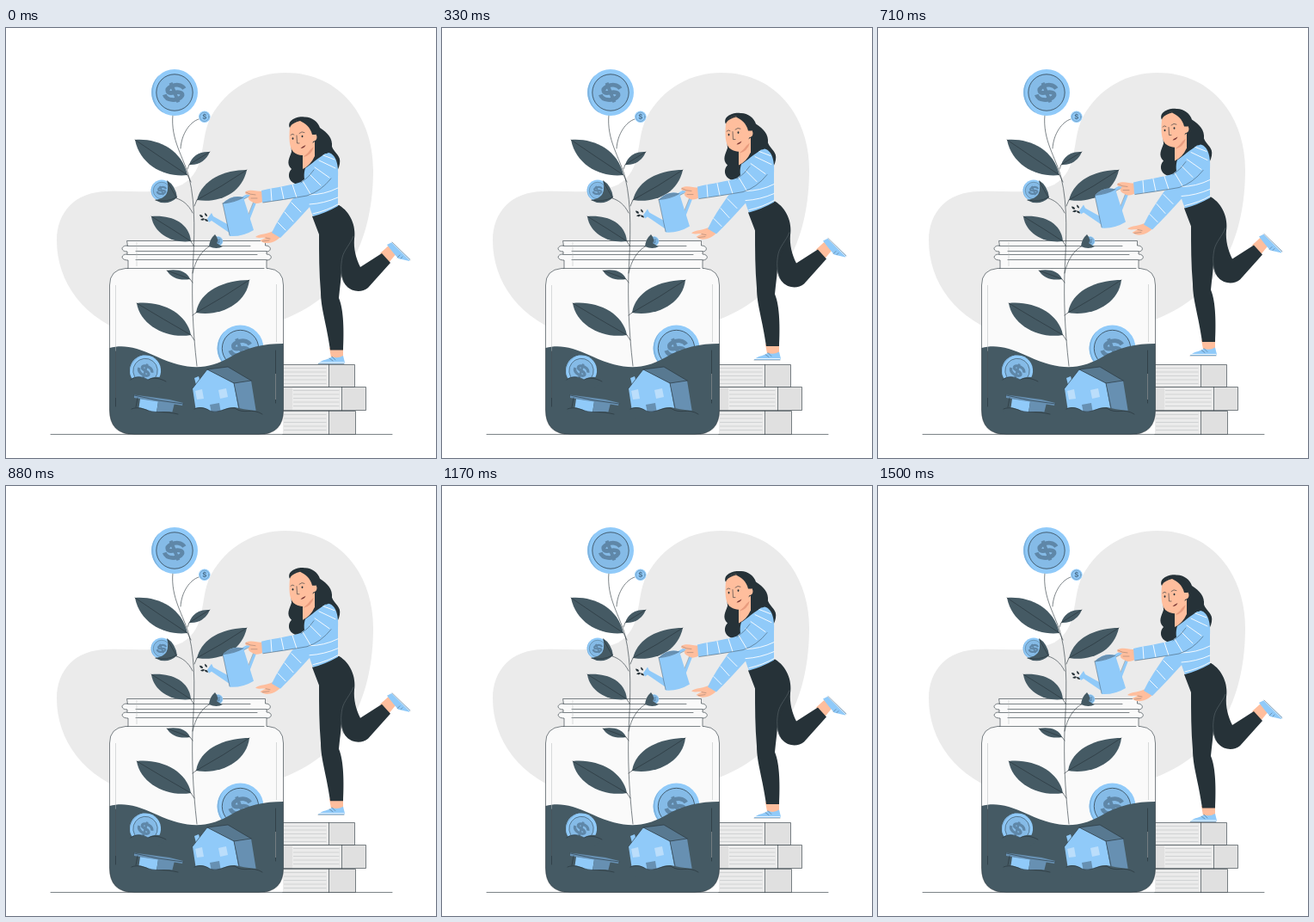
An HTML page for the animation above (1.54 s loop, 500 by 500 pixels).

```html
<!DOCTYPE html>
<html lang="en">
<head>
<meta charset="utf-8">
<title>Growing savings</title>
<style>
  html, body { margin: 0; width: 100%; height: 100%; overflow: hidden; background: #fff; }
  svg { display: block; width: 100vw; height: 100vh; }
  .line { fill: none; stroke: #263238; stroke-width: .6; stroke-linecap: round; stroke-linejoin: round; }
  .faint { fill: none; stroke: #b5b9bb; stroke-width: .5; }
  .white { fill: none; stroke: #fff; stroke-width: .9; stroke-linecap: round; }
  .soil { fill: #455a64; }
  .blue { fill: #90caf9; }
  .shade { fill: #6790b2; }
  .dark { fill: #263238; }
  .skin { fill: #ffbe9d; }
  .glass { fill: #fafafa; }
</style>
</head>
<body>
<svg viewBox="0 0 500 500">
  <defs>
    <g id="coin">
      <circle class="blue" r="27"/>
      <path d="M-18 -20A27 27 0 0 0 -12 24A30 30 0 0 1 -18 -20" fill="#7fb4df"/>
      <circle r="21.2" fill="#85bbe7" stroke="#263238" stroke-width=".7"/>
      <g fill="none" stroke="#5f87a8" stroke-width="4.8" transform="rotate(-12)">
        <path d="M12 -2C10 -8 3 -9 -2 -8C-10 -6 -9 0 -1 0C8 0 11 4 6 7C0 10 -11 8 -12 0"/>
        <path d="M-2 -12L2 12" stroke-width="4"/>
      </g>
    </g>
  </defs>

  <path fill="#ebebeb" d="M325 52C390 52 427 105 427 165C427 240 400 310 322 339C260 365 190 365 150 358C90 340 59 295 59 247C59 215 80 190 118 190C150 189 180 194 205 182C235 165 224 128 239 102C258 69 290 52 325 52Z"/>
  <path class="line" d="M52 472.5H449"/>

  <g id="books"></g>

  <!-- jar -->
  <path class="glass" d="M141 247.500H301.500V253C309 253 309 260 303 260V263C310 263 310 270 303 270V279.500H305Q322.500 281 322.500 299V444Q322.500 472.500 294 472.500H149Q120.500 472.500 120.500 444V299Q120.500 281 139 279.500H142V270C133 270 133 263 141 263V260C133 260 133 253 141 253Z"/>

  <use href="#coin" transform="translate(272.500 372.500)"/>
  <path class="soil" d="M120.500 372C135 368 150 370 175 382C212 399 235 397 260 383C280 371 300 367 322.500 367V444Q322.500 472.500 294 472.500H149Q120.500 472.500 120.500 444Z"/>

  <!-- buried things -->
  <use href="#coin" transform="translate(162 398.500) scale(.67) rotate(38)"/>
  <path class="soil" d="M142 410C150 404 158 405 165 409C172 405 180 404 188 411L175 420H150Z"/>
  <path class="line" d="M145 409C151 404 159 405 165 409C171 406 179 407 186 411"/>

  <path class="blue" d="M156 431L177 434L175 447L154 445Z"/>
  <path class="shade" d="M177 434L196 436L193 448H175Z"/>
  <path class="shade" d="M149 426.500L190 432L206 436L205 439L160 432L149 430Z"/>
  <path class="line" d="M149 427L177 433L206 437M153 430L151 441"/>
  <path class="soil" d="M144 444C152 439 160 442 166 445C176 449 184 443 201 448L190 456H152Z"/>
  <path class="line" d="M146 443C153 440 160 443 166 445C176 448 184 445 200 449"/>

  <path class="blue" d="M219 407L224 405L227 415L222 419Z"/>
  <path class="blue" d="M217 419L234 397L265 413L271 446H221Z"/>
  <path fill="#587991" d="M234 397L258 394L285 410L265 413Z"/>
  <path class="shade" d="M265 413L285 410L291 447H271Z"/>
  <path fill="#bbdefb" d="M220 422L228 420L230 431L222 432ZM247 421L256 419L258 429L249 431Z"/>
  <path class="shade" d="M237 438L248 436L250 448H239Z"/>
  <path class="line" d="M217 419L234 397L265 413L285 410M234 397L258 394L285 410M265 413L271 442"/>
  <path class="soil" d="M216 444C224 439 231 441 237 445C247 450 254 440 266 441C276 443 284 445 299 445L287 455H226Z"/>
  <path class="line" d="M219 443C226 440 232 442 237 445C247 449 254 441 266 442C277 450 286 441 298 449"/>

  <!-- glass outlines -->
  <path class="line" d="M141 247.500H301.500V253C309 253 309 260 303 260V263C310 263 310 270 303 270V279.500H305Q322.500 281 322.500 299V444Q322.500 472.500 294 472.500H149Q120.500 472.500 120.500 444V299Q120.500 281 139 279.500H142V270C133 270 133 263 141 263V260C133 260 133 253 141 253Z"/>
  <path class="line" d="M141 253.500H284M151 259.500H303M141 263.500H292M151 269.500H303M142 279.500H300"/>
  <path class="faint" d="M127.500 299V430M314.500 298V365"/>
  <path class="line" d="M127.500 376V440M313.500 375V436"/>
  <path class="faint" d="M313.500 402V432M152 249V277"/>

  <!-- plant -->
  <path class="line" d="M222 393C217 350 216 315 217 284C219 245 221 207 213 174C207 151 191 130 194 101M203 140C204 123 214 109 224 106M217 215C212 205 205 200 198 198M217 285C220 270 228 258 238 253M211 171L215 179M213 159L211 164M222 200L219 207M215 248L218 253M214 292L217 296M221 331L217 334M215 357L219 363"/>
  <g id="leaves"></g>
  <use href="#coin" transform="translate(196 75)"/>
  <circle class="blue" cx="230.800" cy="103.300" r="6.700"/>
  <circle class="line" cx="230.800" cy="103.300" r="5.200" stroke-opacity=".4"/>
  <text x="230.800" y="106.200" font-family="Inter, sans-serif" font-size="8" font-weight="700" text-anchor="middle" fill="#4f7390">$</text>
  <use href="#coin" transform="translate(181 189) scale(.46)"/>
  <path class="soil" d="M187 177Q197 183 199 197Q187 208 173 200Q187 198 188 188Q189 182 187 177Z"/>
  <path class="line" d="M198 197Q193 188 188 179M198 197Q187 203 174 200"/>
  <use href="#coin" transform="translate(246.500 248) scale(.21)"/>
  <path class="soil" d="M243 240Q248 246 245 250Q249 253 252 254Q245 258 236 254Q237 245 243 240Z"/>

  <g id="gardener">
    <!-- water drops -->
    <path class="dark" d="M225 217q4 0 4 3q-3 1 -4 -3M231 215q3 1 3 4q-3 0 -3 -4M226 223q3 -3 5 -1q-1 3 -5 1M231 222q4 0 4 3q-4 0 -4 -3"/>

    <!-- far arm -->
    <path class="skin" d="M313 235C305 240 294 239 290 243C295 245 299 243 302 244C297 246 294 248 297 248C299 251 311 252 319 243Z"/>
    <path class="line" d="M302 244L307 245M298 248L306 247" stroke-opacity=".45"/>
    <path class="blue" d="M350 190L333 199C324 212 315 225 309 238L319 244C332 231 343 219 354 207Z"/>
    <path class="white" d="M316 226L325 235M324 214L334 225M332 203L343 214"/>

    <!-- watering can -->
    <path d="M274 199C286 190 294 192 289 204L282 222" fill="none" stroke="#90caf9" stroke-width="3.200"/>
    <path class="line" d="M275 200C286 193 291 194 287 204L281 219" stroke-opacity=".5"/>
    <path class="blue" d="M234 222L239 215L241 219L259 229L261 239L239 224L236 226Z"/>
    <path class="blue" d="M252 204Q263 193 276 197L288 235Q275 243 260 242Z"/>
    <path class="shade" d="M252 204Q263 193 276 197Q266 202 252 204Z"/>
    <path class="line" d="M252 204Q266 203 276 197M252 204L260 241" stroke-opacity=".6"/>

    <!-- raised leg, then standing leg -->
    <path class="skin" d="M435 262L446 252L455 261L445 273Z"/>
    <path class="blue" d="M443 252L449 249L470 269L469 271L456 268L450 261Z"/>
    <path class="white" d="M449 249.500L469.500 270" stroke-width="1.400"/>
    <path class="line" d="M449 249L470 269.500M455 267L458 264M459 268L461 266" stroke-opacity=".6"/>
    <path class="skin" d="M376 372H392V383L384 386L378 383Z"/>
    <path class="blue" d="M363 390C368 385 375 386 379 382Q385 385 392 381L394 389L393 390.500H363Z"/>
    <path class="white" d="M364 389H393"/>
    <path class="line" d="M363 390.500H393M376 384L380 387M379 382L383 386" stroke-opacity=".6"/>
    <path class="dark" d="M387 206C401 214 407 231 405 245C404 257 407 268 412 278L437 262L447 273L421 302C414 308 402 307 396 300C392 296 391 291 389 284L388 220Z"/>
    <path class="dark" d="M356 219L387 206C398 215 404 229 404 242L390 280C390 291 388 302 387 314C393 328 393 354 392 374.500H377C373 345 366 326 366 307C364 285 364 262 364 240Z"/>
    <path d="M404 242C400 252 393 258 391 267C389 277 389 286 393 296" fill="none" stroke="#5c676c" stroke-width=".6"/>

    <!-- hair, head and neck -->
    <path class="dark" d="M330 116C326 108 338 102 347 103.500C355 103 363 109 365 116C374 122 380 128 379 138C382 146 390 148 388 158C386 169 379 174 370 173C356 169 351 182 336 181C328 178 327 169 332 164C325 157 330 151 332 144Z"/>
    <path class="skin" d="M345 142V164Q354 160 359 149L359 132Z"/>
    <path fill="#e99c7e" d="M346 150Q355 148 358 138L352 143Z"/>
    <path class="skin" d="M330 116C329 127 329 138 334 144C340 149 348 150 352 144Q356 139 357 132C364 131 362 121 357 123C355 115 349 109 342 107C336 107 332 110 330 116Z"/>
    <path class="dark" d="M330 115C331 106 349 103 356 112C360 117 360 120 360 124L356 124C354 115 348 111 342 108C337 109 333 111 330 115Z"/>
    <ellipse class="dark" cx="333.500" cy="128.500" rx=".9" ry="1.300"/>
    <ellipse class="dark" cx="344.500" cy="126" rx=".9" ry="1.300"/>
    <path class="line" d="M331 124.500Q333 122 335 124M341 122.500Q344 119.500 347 121.500M338 125L338.500 134L341 134"/>
    <path d="M342.500 140Q347 140 348.500 136Q344 138 342.500 140Z" fill="#7b3937"/>

    <!-- sweater -->
    <path class="blue" d="M375 145C385 147 387 162 386 175V207Q372 215 357 219C352 207 349 195 350 185C346 177 346 169 348 163C355 159 361 151 375 145Z"/>
    <path class="white" d="M353 205Q370 204 386 197M352 194Q370 194 386 186M357 216Q374 212 386 205"/>
    <path class="skin" d="M299 190C291 190 285 187 279 190C276 193 281 194 284 194C281 197 281 200 286 202C291 206 296 203 299 202Z"/>
    <path class="line" d="M279 191Q284 194 290 194M285 198L292 198" stroke-opacity=".45"/>
    <path class="blue" d="M371 146C382 145 387 157 383 168C377 179 363 192 350 195C335 198 315 201 298 203L297 189C314 185 332 183 343 179C355 171 360 153 371 146Z"/>
    <path class="white" d="M308 187L309 201M320 185L323 199M333 182L338 197M345 178L354 193M353 170L366 183M359 162L376 174M364 154L383 163M369 148L382 153"/>
    <path class="line" d="M299 203Q333 198 350 195Q366 190 378 175M343 180Q353 173 358 165" stroke-opacity=".7"/>
  </g>
</svg>

<script>
const LOOP = 1540, CYCLE = 1500, RISE = 10;
const byId = id => document.getElementById(id);
const path = (cls, d) => `<path class="${cls}" d="${d}"/>`;

// Each leaf: outline from tip to base and back.
const leaves = [
  [150, 130, 175, 128, 204, 140, 211, 171, 185, 174, 156, 160],
  [237, 144, 225, 143, 216, 149, 213, 159, 224, 160, 233, 154],
  [280, 165, 254, 165, 228, 176, 222, 200, 247, 204, 274, 193],
  [169, 219, 190, 217, 213, 225, 215, 248, 195, 251, 172, 240],
  [187, 282, 198, 280, 210, 282, 214, 292, 203, 294, 192, 291],
  [283, 293, 255, 293, 225, 305, 221, 331, 250, 336, 280, 320],
  [152, 320, 180, 317, 210, 331, 215, 357, 186, 362, 156, 345]
];
byId('leaves').innerHTML = leaves.map(([x, y, a, b, c, d, u, v, e, f, g, h]) =>
  path('soil', `M${x} ${y}C${a} ${b} ${c} ${d} ${u} ${v}C${e} ${f} ${g} ${h} ${x} ${y}`) +
  path('line', `M${x} ${y}Q${(a + g + c + e) / 4} ${(b + h + d + f) / 4} ${u} ${v}`)
).join('');

// Each book: top, bottom, start of the spine, right edge.
const books = [[391.5, 417.5, 375.5, 405.5], [417.5, 444.5, 390.5, 418.5], [445.5, 472.5, 375.5, 406.5]];
byId('books').innerHTML = books.map(([top, bottom, spine, right], i) => {
  let pages = '';
  for (let y = top + 4; y < bottom - 2; y += 4.5) pages += `M${i === 1 ? 334 : 323} ${y}H${spine - 3}`;
  return `<path fill="#ebebeb" d="M322 ${top}H${spine}V${bottom}H322Z"/>
    <path fill="#e0e0e0" d="M${spine} ${top}H${right}V${bottom}H${spine}Z"/>` +
    (i === 1 ? `<path fill="#e0e0e0" d="M322 ${top}H333V${bottom}H322Z"/>` : '') +
    path('faint', pages) +
    path('line', `M322 ${top}H${right}V${bottom}H322M${spine} ${top}V${bottom}`);
}).join('');

const gardener = byId('gardener');
function draw() {
  const t = Math.min(performance.now() % LOOP, CYCLE);
  const lift = RISE * (1 - Math.abs(2 * t / CYCLE - 1));
  gardener.setAttribute('transform', `translate(0 ${-lift})`);
  requestAnimationFrame(draw);
}
draw();
</script>
</body>
</html>
```
